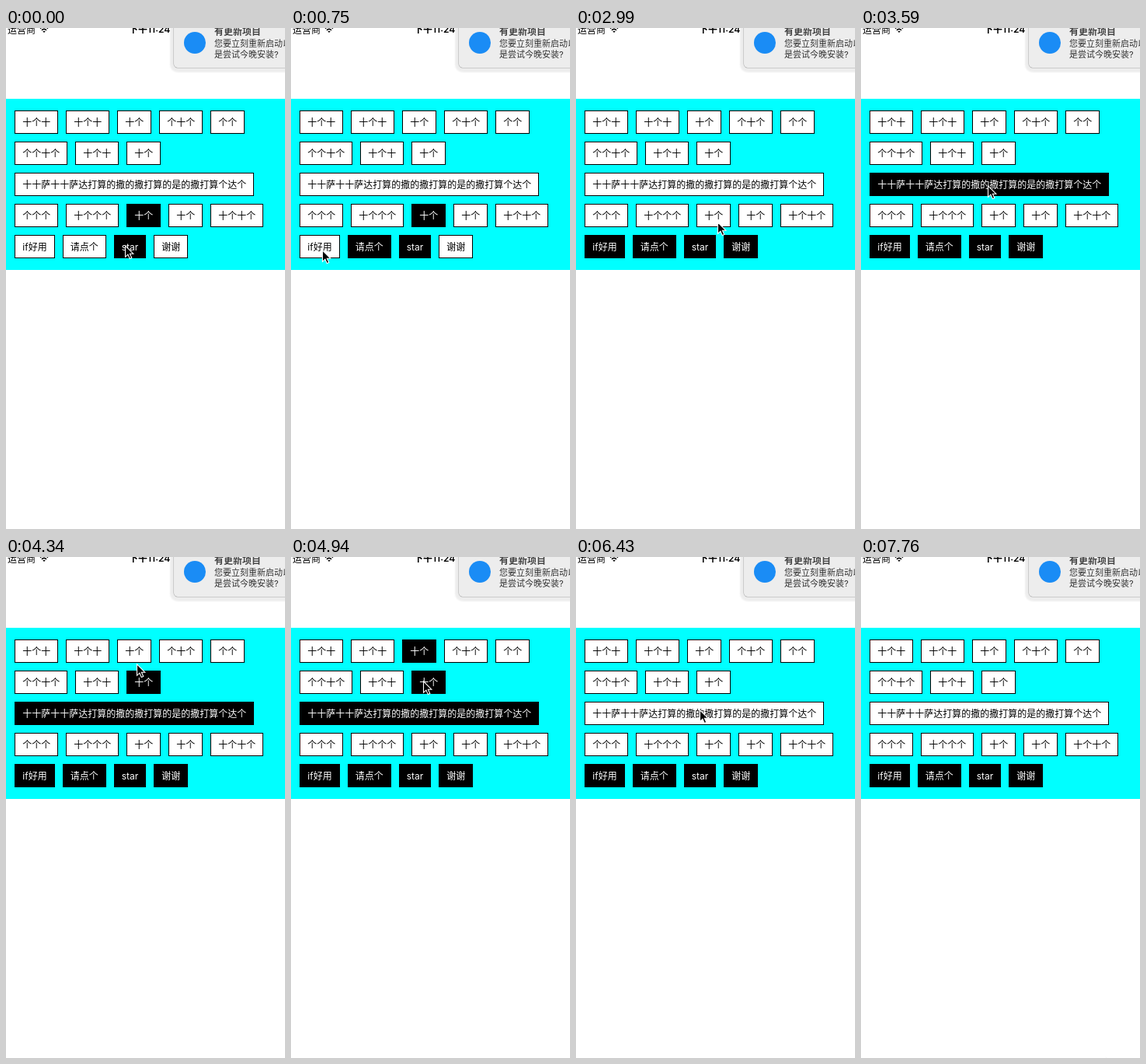
An HTML page that plays this animation: 359x644 px, repeating every 8320 ms.

```html
<!DOCTYPE html>
<html lang="zh-CN">
<head>
<meta charset="utf-8">
<style>
html, body { margin: 0; width: 100%; height: 100%; overflow: hidden; background: #fff; }
body { position: relative; font: 12px/14px Inter, "Noto Sans CJK SC", "Noto Sans CJK", sans-serif; color: #000; }
body > * { position: absolute; white-space: nowrap; }
#carrier { left: 2px; top: -4px; }
#wifi { left: 43px; top: -3px; }
#clock { left: 158px; top: -5px; font-weight: 600; }
#notice {
  left: 216px; top: -20px; width: 180px; height: 71px; border-radius: 5px;
  background: #ededed; box-shadow: 0 0 0 .5px #aaa, 0 1px 2px 5px rgba(0, 0, 0, .07);
  color: #333; font-size: 11px;
}
#notice * { position: absolute; left: 52px; }
#notice b { top: 18px; font-size: 12px; color: #444; }
#notice i { left: 13px; top: 25px; width: 28px; height: 28px; border-radius: 50%; background: #1a8cf5; }
#tags {
  left: 0; top: 91px; width: 359px; height: 220px; box-sizing: border-box; padding: 15px 0 15px 11.3px;
  display: flex; flex-wrap: wrap; gap: 10px; align-content: flex-start; background: #0ff;
}
#tags span { height: 28px; line-height: 30px; padding: 0 9px; border: 1px solid #000; background: #fff; }
#tags .on { background: #000; color: #fff; }
#cursor { left: 0; top: 0; overflow: visible; pointer-events: none; }
</style>
</head>
<body>
<div id="carrier">运营商</div>
<svg id="wifi" width="12" height="10" fill="none" stroke="#000" stroke-width="1.7">
  <path d="M1 3.5Q6-1 11 3.5M3 5.8Q6 3 9 5.8"/>
  <path d="M6 9L4.2 7.3Q6 6 7.8 7.3Z" fill="#000" stroke="none"/>
</svg>
<div id="clock">下午11:24</div>
<div id="notice">
  <i></i><b>有更新项目</b>
  <span style="top:33px">您要立刻重新启动以</span>
  <span style="top:47px">是尝试今晚安装?</span>
</div>
<div id="tags"></div>
<svg id="cursor" width="13" height="20">
  <path d="M.5.8V15.3L3.9 12.2L6.3 17.6L8.8 16.5L6.4 11.2H10.8Z" stroke="#fff" stroke-width="1.1"/>
</svg>
<script>
const LOOP = 8320, TICK = 149.2;

// A leading * marks a tag that starts selected.
const labels = ('十个十 十个十 十个 个十个 个个 个个十个 十个十 十个 ' +
  '十十萨十十萨达打算的撒的撒打算的是的撒打算个达个 ' +
  '个个个 十个个个 *十个 十个 十个十个 if好用 请点个 *star 谢谢').split(' ');

// Cursor stops, timed in ticks; a click toggles the tag under the tip.
const stop = (x, y, arrive, click, travel = 2) => ({ x, y, arrive, click, travel });
const stops = [
  stop(153, 279, 0),
  stop(113, 279, 1, 3, 1),
  stop(40, 285, 5, 7),
  stop(186, 279, 10, null, 3),
  stop(200, 279, 15, 16),
  stop(182, 249, 18, 20, 1),
  stop(163, 202, 23, 24),
  stop(168, 153, 26, 28),
  stop(167, 120, 30, 31),
  stop(170, 159, 33, 35),
  stop(168, 119, 37, 38),
  stop(159, 196, 41, 43),
  stop(273, 559, 49, null, 4),
  stop(314, 642, 52)
];

const cursor = document.getElementById('cursor');
const tags = labels.map(label => {
  const tag = document.createElement('span');
  tag.textContent = label.replace('*', '');
  document.getElementById('tags').append(tag);
  return tag;
});
const clicks = stops.filter(s => s.click)
  .map(s => ({ tick: s.click, tag: document.elementFromPoint(s.x, s.y) }));

const smooth = p => p * p * (3 - 2 * p);

function cursorAt(tick) {
  let { x, y } = stops[0];
  for (const s of stops.slice(1)) {
    const p = (tick - s.arrive) / s.travel + 1;
    const k = smooth(Math.min(1, Math.max(0, p)));
    x += (s.x - x) * k;
    y += (s.y - y) * k;
  }
  return [Math.round(x), Math.round(y)];
}

function draw() {
  const tick = Math.floor(performance.now() % LOOP / TICK);
  tags.forEach((tag, i) => tag.classList.toggle('on', labels[i][0] === '*'));
  for (const c of clicks) if (c.tick <= tick) c.tag.classList.toggle('on');
  const [x, y] = cursorAt(tick);
  cursor.style.transform = `translate(${x}px, ${y}px)`;
  requestAnimationFrame(draw);
}
draw();
</script>
</body>
</html>
```
